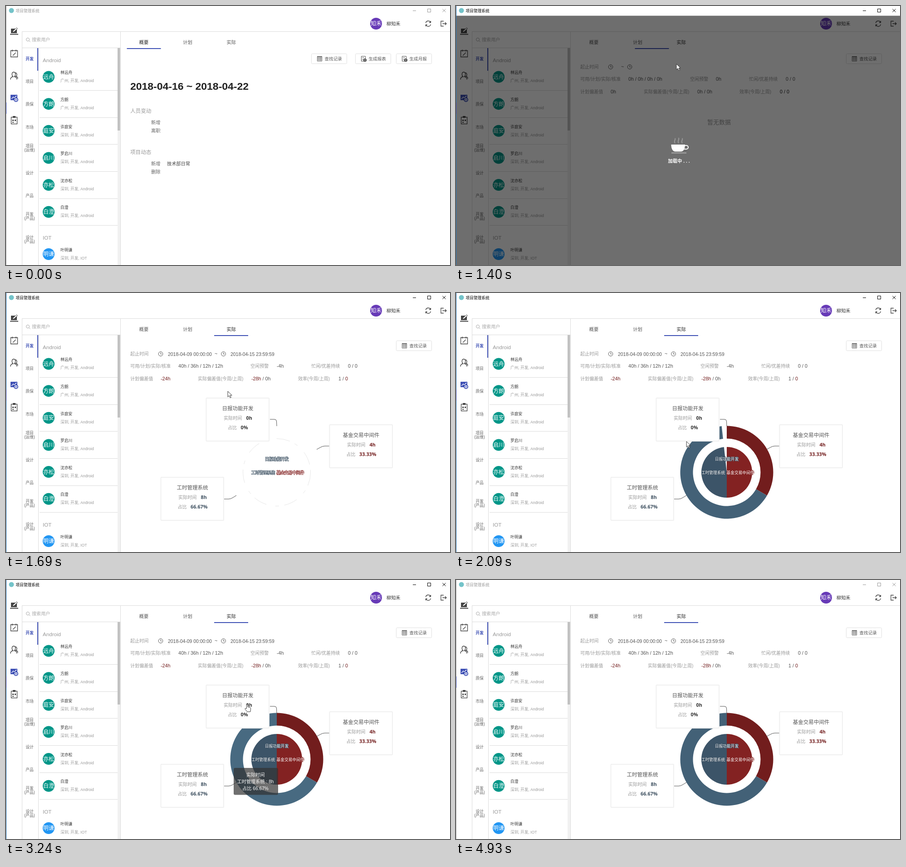
An HTML page that plays this animation: 979 by 572 pixels, repeating every 5020 ms.

```html
<!DOCTYPE html>
<html lang="zh-CN">
<head>
<meta charset="utf-8">
<title>项目管理系统</title>
<style>
html, body { margin: 0; width: 100%; height: 100%; overflow: hidden; background: #fff; }
svg { display: block; position: absolute; left: 0; top: 0; }
text { font-family: "Liberation Sans", "Noto Sans CJK SC", sans-serif; white-space: pre; }
.num { font-family: "Open Sans", "Noto Sans CJK SC", sans-serif; font-weight: 700; }
.line { fill: none; stroke: #444; stroke-width: 1.3; }
.thin { fill: none; stroke: #555; stroke-width: 1; }
.rule { fill: none; stroke: #dcdcdc; stroke-width: 1; }
</style>
</head>
<body>
<svg id="stage" width="979" height="572" viewBox="0 0 979 572"></svg>
<script>
const LOOP = 5020;
const BLUE = '#3f51b5', RED = '#721d1d', GREY = '#999', INK = '#555';

// ---------- drawing helpers ----------
const text = (x, cy, size, fill, str, more = '') =>
  `<text x="${x}" y="${cy + size * .37}" font-size="${size}" fill="${fill}" ${more}>${str}</text>`;
const mid = (x, cy, size, fill, str, more = '') =>
  text(x, cy, size, fill, str, 'text-anchor="middle" ' + more);
const path = (d, more = 'class="line"') => `<path d="${d}" ${more}/>`;
const rect = (x, y, w, h, more) => `<rect x="${x}" y="${y}" width="${w}" height="${h}" ${more}/>`;
const disc = (x, y, r, fill) => `<circle cx="${x}" cy="${y}" r="${r}" fill="${fill}"/>`;
const group = (id, body) => `<g id="${id}">${body}</g>`;
const red = s => `<tspan fill="${RED}">${s}</tspan>`;
const clock = x =>
  `<circle cx="${x}" cy="134.500" r="4.800" class="thin"/>` + path(`M${x} 131.500v3.300h2.500`, 'class="thin"');

function button(x, label, doc) {
  const icon = doc
    ? path(`M${x + 20} 122h-6.500v-11h9v5M${x + 15.500} 114h4M${x + 15} 119l3-2`, 'class="thin"') +
      disc(x + 21.500, 119.500, 3.600, '#444') +
      path(`M${x + 21.500} 121.500v-3.500m-1.500 1.500l1.500-1.500l1.500 1.500`, 'fill="none" stroke="#fff" stroke-width=".8"')
    : rect(x + 13.500, 111.500, 10, 10, 'class="thin"') +
      path(`M${x + 14} 113h9M${x + 14} 117h9M${x + 17} 112v9M${x + 20.500} 112v9`, 'class="thin"');
  return rect(x + .5, 105.500, 78, 22, 'rx="2" fill="#fff" stroke="#e0e0e0"') + icon +
    text(x + 29.500, 116.500, 9.600, INK, label);
}

// ---------- window frame ----------
const titleBar = group('bar',
  text(21.500, 10.500, 8.700, 'currentColor', '项目管理系统') +
  path('M897 10.500h7M929.500 6.500h7v7h-7zM962.500 6.500l7 7m0-7l-7 7', 'fill="none" stroke="currentColor"'));

const header =
  disc(816, 39, 13, '#673ab7') + mid(816, 39, 12, '#fff', '知禾') +
  text(839, 39.500, 10.200, '#333', '柳知禾') +
  path('M925.500 37.500a5.600 5.600 0 0 1 10.500-1.500m.5-3v3.500h-3.500M936.500 40.500a5.600 5.600 0 0 1-10.500 1.500m-.5 3v-3.500h3.500') +
  path('M965 33.500h-6v11h6M962.500 39h8.500m-3-3l3 3l-3 3');

const menu =
  rect(11, 50, 13, 10, 'fill="#444"') + path('M9 62.500h18', 'stroke="#444" stroke-width="2"') +
  path('M14.500 58l1-3l8-7l2 2l-8 7z', 'fill="#fff" stroke="#444"') +
  path('M10.500 98.500h15v14h-15zM14 96.500v4m8-4v4M15 109.500l6.500-6.500') +
  path('M10 162.500c0-4 2-6 5.500-6.500c-3-2-3.500-10 1.500-10s4.500 8 1.500 10c3.500.5 5.500 2.500 5.500 6.500M20.500 147.500c4 0 4.500 6 1.500 8c2.500.5 4 2 4 5') +
  rect(10, 196, 15, 12, `fill="${BLUE}"`) + path('M12 205l4-4l3 2l4-5', 'fill="none" stroke="#fff" stroke-width="1.300"') +
  `<circle cx="22" cy="207" r="4" fill="#fff" stroke="${BLUE}" stroke-width="2"/>` + disc(22, 207, 1.500, BLUE) +
  rect(11.500, 245.500, 13, 15, 'class="line"') + rect(15, 243, 6, 4, 'fill="#444"') +
  path('M14 251h3v3h-3zM19 251h3v3h-3zM14 256h3v2h-3z', 'fill="#444"');

const lines = path('M35 56.500H979M35.500 56V572M36 92.500H252M71.500 92V572M252.500 56V572', 'class="rule"');

// ---------- people list ----------
const cats = [['开发', 117], ['项目', 167], ['质保', 217], ['市场', 268], ['项目', 309], ['(运维)', 318],
  ['设计', 368.500], ['产品', 419], ['开发', 460], ['(产品)', 469], ['设计', 510.500], ['(产品)', 519.500]];
const people = [['林远舟', '广州'], ['方朗', '广州'], ['许庭安', '深圳'], ['罗启川', '深圳'], ['沈亦松', '深圳'], ['白澄', '深圳']];
const person = (name, city, team, y, color) =>
  disc(94, y, 13, color) + mid(94, y, 12, '#fff', name.slice(-2)) +
  text(120, y - 9.500, 8.700, '#333', name) + text(120, y + 8.500, 8.650, GREY, `${city}, 开发, ${team}`);

const list =
  `<circle cx="48" cy="74" r="3.500" fill="none" stroke="#aaa"/>` + path('M50.500 76.500l3 3', 'stroke="#aaa"') +
  text(57, 74.500, 10.100, '#aaa', '搜索用户') +
  cats.map(([s, y], i) => mid(52, y, 8.900, i ? '#666' : BLUE, s, i ? '' : 'font-weight="700"')).join('') +
  rect(69, 93, 2, 50, `fill="${BLUE}"`) +
  text(81, 120, 11.600, GREY, 'Android') +
  people.map(([n, c], i) => person(n, c, 'Android', 156.500 + i * 59.650, '#009688') +
    path(`M74 ${Math.round(186 + i * 59.650) + .5}H246`, 'class="rule"')).join('') +
  text(81, 511.500, 11.600, GREY, 'IOT') + person('叶明谦', '深圳', 'IOT', 548, '#2196f3') +
  rect(246, 93, 6, 479, 'fill="#f1f1f1"') + rect(246, 93, 5.500, 182, 'fill="#c1c1c1"');

// ---------- tabs and pages ----------
const tabs = ['概要', '计划', '实际'].map((s, i) =>
  mid(304 + i * 96.400, 80, 10.200, INK, s, `id="tab${i}"`)).join('') +
  rect(0, 93, 75, 2, `id="ink" fill="${BLUE}"`);

const overview = group('overview',
  button(673, '查找记录') + button(770, '生成报表', true) + button(860, '生成月报', true) +
  text(274, 177, 22.960, '#222', '2018-04-16 ~ 2018-04-22', 'font-weight="700"') +
  text(274, 232, 11.600, GREY, '人员变动') + text(320, 257, 10.300, '#666', '新增') + text(320, 275.500, 10.300, '#666', '离职') +
  text(274, 323, 11.600, GREY, '项目动态') + text(320, 348, 10.300, '#666', '新增') +
  text(355, 348, 10.200, '#444', '技术部日常') + text(320, 366.500, 10.300, '#666', '删除'));

// Each column: label and value positions.
function stats(cols, vals) {
  const names = ['可用/计划/实际/核准', '空闲预警', '忙闲/优差持续', '计划偏差值', '实际偏差值(今周/上周)', '效率(今周/上周)'];
  return names.map((n, i) => {
    const y = i < 3 ? 161.500 : 189;
    return text(cols[i][0], y, 10.100, GREY, n) + text(cols[i][1], y, 10.750, INK, vals[i]);
  }).join('');
}
const actual = group('actual', button(860, '查找记录') + text(274, 134.500, 10.100, GREY, '起止时间') + clock(341));

const empty = group('empty',
  text(364, 134, 10.700, INK, '~') + clock(383) +
  stats([[274, 380], [516, 573], [646, 727], [274, 341], [414, 532], [625, 714]],
    ['0h / 0h / 0h / 0h', '0h', '0 / 0', '0h', '0h / 0h', '<tspan fill="#222">0 / 0</tspan>']) +
  mid(580, 256, 13, GREY, '暂无数据'));

const card = (x, y, title, hours, share, dx, fill) =>
  rect(x - .5, y, 138.500, 95, 'rx="1" fill="#fff" stroke="#f0f0f0" stroke-width="2"') +
  mid(x + 69, y + 22.500, 11.500, INK, title) +
  text(x + 38, y + 44, 10.100, GREY, '实际时间') + text(x + 87.500, y + 44, 10.800, fill, hours, 'class="num"') +
  text(x + dx, y + 65.500, 10.100, GREY, '占比') + text(x + dx + 28.500, y + 65.500, 10.800, fill, share, 'class="num"');
const label = (x, y, s, edge) =>
  mid(x, y, 8.700, '#fff', s, `stroke="${edge}" stroke-width="1.400" paint-order="stroke"`);

const report = group('report',
  text(357, 135, 10.450, INK, '2018-04-09 00:00:00') + text(460, 134, 10.700, INK, '~') + clock(479.500) +
  text(495, 135, 10.450, INK, '2018-04-15 23:59:59') +
  stats([[274, 380], [539, 597], [673, 754], [274, 341], [423, 541], [644, 733]],
    ['40h / 36h / 12h / 12h', '-4h', '0 / 0', red('-24h'), red('-28h') + ' / 0h', '1 / ' + red('0')]) +
  '<circle id="rim" cx="597" cy="396" r="74.500" fill="none" stroke="#ccc" stroke-width=".5" stroke-dasharray="30 12 8 20"/>' +
  ['ringRed', 'ringBlue', 'pieRed', 'pieBlue'].map(id => `<path id="${id}"/>`).join('') +
  path('M582 279h10q4 0 4.500 4l.5 11M685 345.500l9-5q4-2.500 9-2.500h10M481 455h10q5 0 9-3l8-5', 'class="thin"') +
  label(597, 367, '日报功能开发', '#34495b') + label(567, 397, '工时管理系统', '#34495b') + label(627, 397, '基金交易中间件', '#832222') +
  card(442, 232, '日报功能开发', '0h', '0%', 47, '#333') +
  card(714, 291, '基金交易中间件', '4h', '33.33%', 36.500, RED) +
  card(342, 407, '工时管理系统', '8h', '66.67%', 36.500, '#3c4e5e'));

const tip = (id, w, rows) => group(id,
  rect(0, 0, w, 59.500, 'rx="3" fill="#323232" fill-opacity=".7"') +
  rows.map((s, i) => mid(w / 2 - 1, 15.500 + i * 15, 10.200, '#fff', s, 'font-weight="500"')).join(''));

const loading = group('loading',
  rect(1, 21.500, 978, 551, 'fill="#000" fill-opacity=".57"') +
  path('M474.500 306h30.500c0 10-4 15.500-9 15.500h-12.500c-5 0-9-5.500-9-15.500z', 'fill="#fff"') +
  path('M504 308h4a3.600 3.600 0 0 1 0 8h-5', 'fill="none" stroke="#fff" stroke-width="2"') +
  path('M475 324.500h33', 'stroke="#aaa" stroke-width="2"') +
  path('M483 303c-4-5 2-7 0-11M491 303c-4-5 2-7 0-12M499 303c-4-5 2-7 0-11', 'id="steam" fill="none" stroke="#999" stroke-width="2"') +
  mid(491.500, 342.500, 10.300, '#fff', '加载中 . . .', 'font-weight="700"'));

const cursors =
  group('arrow', path('M0 0v12.500l3-2.800l2.200 4.800l2.200-1l-2.200-4.500h4z', 'fill="#fff" stroke="#222" stroke-width=".9"')) +
  group('hand', path('M-1.500 9V1.200a1.500 1.500 0 0 1 3 0V5.500l4.500 1q2 .5 1.800 3l-.8 6.500h-7l-4.500-5.500q-1-2 1-2z',
    'fill="#fff" stroke="#222" stroke-width=".9"'));

document.getElementById('stage').innerHTML =
  disc(12, 10, 5.500, '#74c3c9') + titleBar + header + menu + lines + list + tabs +
  overview + actual + empty + report +
  tip('tipRed', 109, ['核准时间', '基金交易中间件 : 6h', '占比 50%']) +
  tip('tipBlue', 98, ['实际时间', '工时管理系统 : 8h', '占比 66.67%']) +
  loading + rect(0, 0, 1, 572, 'id="edge"') + rect(0, 213, 1, 25, `fill="${BLUE}"`) + cursors;

// ---------- motion ----------
const $ = id => document.getElementById(id);
const show = (id, on) => { $(id).style.display = on ? '' : 'none'; };
const move = (id, [x, y]) => $(id).setAttribute('transform', `translate(${x} ${y})`);

// Bursts of movement: first step, last step, number of steps.
const bursts = [[70, 550, 7], [680, 920, 4], [1150, 1620, 7], [1690, 2170, 7],
  [2230, 2690, 7], [2770, 3240, 7], [3320, 3770, 7], [3920, 4230, 5], [4930, 4930, 1]];
function stepped(t) {
  let out = 0;
  for (const [a, b, n] of bursts) {
    if (t < a) break;
    out = t >= b ? b : a + Math.floor((t - a) * (n - 1) / (b - a)) * (b - a) / (n - 1);
  }
  return out;
}

const pointer = [[70, 844, 484], [550, 404, 86], [680, 410, 86], [920, 483, 84], [1230, 483, 84], [1385, 486, 128],
  [1690, 489, 217], [2170, 512, 350], [2300, 535, 400], [2535, 622, 393], [2690, 650, 405], [2770, 640, 410],
  [3005, 508, 400], [3235, 531, 277], [3320, 545, 242], [3770, 735, 528], [3920, 740, 534], [4230, 890, 572]];
const tipPath = [[2230, 545, 412], [2535, 605, 378], [2690, 630, 390], [2770, 634, 395], [3005, 484, 425], [3235, 502, 415]];
const inkPath = [[1230, 266.500], [1385, 394.500], [1540, 459]];

function at(keys, t) {
  if (t <= keys[0][0]) return keys[0].slice(1);
  for (let i = 1; i < keys.length; i++) {
    const [a, ...p] = keys[i - 1], [b, ...q] = keys[i];
    if (t < b) return p.map((v, k) => v + (q[k] - v) * (t - a) / (b - a));
  }
  return keys[keys.length - 1].slice(1);
}

function sector(id, r0, r1, from, to, sweep, fill) {
  const end = Math.min(to, sweep);
  const pt = (r, deg) => {
    const a = deg * Math.PI / 180;
    return `${597 + r * Math.sin(a)} ${396 - r * Math.cos(a)}`;
  };
  const big = end - from > 180 ? 1 : 0;
  $(id).setAttribute('d', end <= from ? '' :
    `M${pt(r0, from)}L${pt(r1, from)}A${r1} ${r1} 0 ${big} 1 ${pt(r1, end)}` +
    `L${pt(r0, end)}A${r0} ${r0} 0 ${big} 0 ${pt(r0, from)}Z`);
  $(id).setAttribute('fill', fill);
}

function draw(time) {
  const t = stepped(time), within = (a, b) => t >= a && t < b;

  const active = within(680, 4930);
  $('bar').style.color = active ? '#000' : '#999';
  $('edge').setAttribute('fill', active ? '#2878b8' : '#b5b5b5');

  const dark = [t < 1300, within(460, 760), t >= 830];
  dark.forEach((on, i) => {
    $('tab' + i).setAttribute('fill', on ? '#222' : INK);
    $('tab' + i).setAttribute('font-weight', on ? 500 : 400);
  });
  $('ink').setAttribute('x', at(inkPath, t)[0]);

  show('overview', t < 1150);
  show('actual', t >= 1150);
  show('empty', within(1150, 1690));
  show('report', t >= 1690);
  show('loading', within(1300, 1690));
  $('loading').style.opacity = t < 1380 ? .6 : 1;
  $('steam').style.opacity = .75 + .25 * Math.cos((t - 1385) / 80);

  const grow = Math.min(1, Math.max(0, (t - 1690) / 540));
  const sweep = 359.990 * (1 - (1 - grow) ** 3);
  const blueUp = within(2230, 2380) || within(2920, 3200);
  const redUp = within(2380, 2920);
  show('rim', t === 1690);
  sector('ringRed', 74.500, 102.500, 0, 120, sweep, RED);
  sector('ringBlue', 74.500, blueUp ? 110 : 102.500, 120, 360, sweep, blueUp || within(3200, 3300) ? '#486a81' : '#436177');
  sector('pieRed', 0, redUp ? 63 : 56, 0, 180, sweep, redUp ? '#922524' : '#832222');
  sector('pieBlue', 0, 56, 180, 360, sweep, '#3c5468');

  const spot = at(tipPath, t);
  move('tipRed', spot);
  move('tipBlue', spot);
  show('tipRed', redUp);
  show('tipBlue', within(2230, 2380) || within(2920, 3390));

  const hand = within(2230, 3320), tipPoint = at(pointer, t);
  show('hand', hand);
  show('arrow', !hand && within(70, 4230));
  move('hand', tipPoint);
  move('arrow', tipPoint);
}

const start = performance.now();
function tick() {
  draw((performance.now() - start) % LOOP);
  requestAnimationFrame(tick);
}
tick();
</script>
</body>
</html>
```
